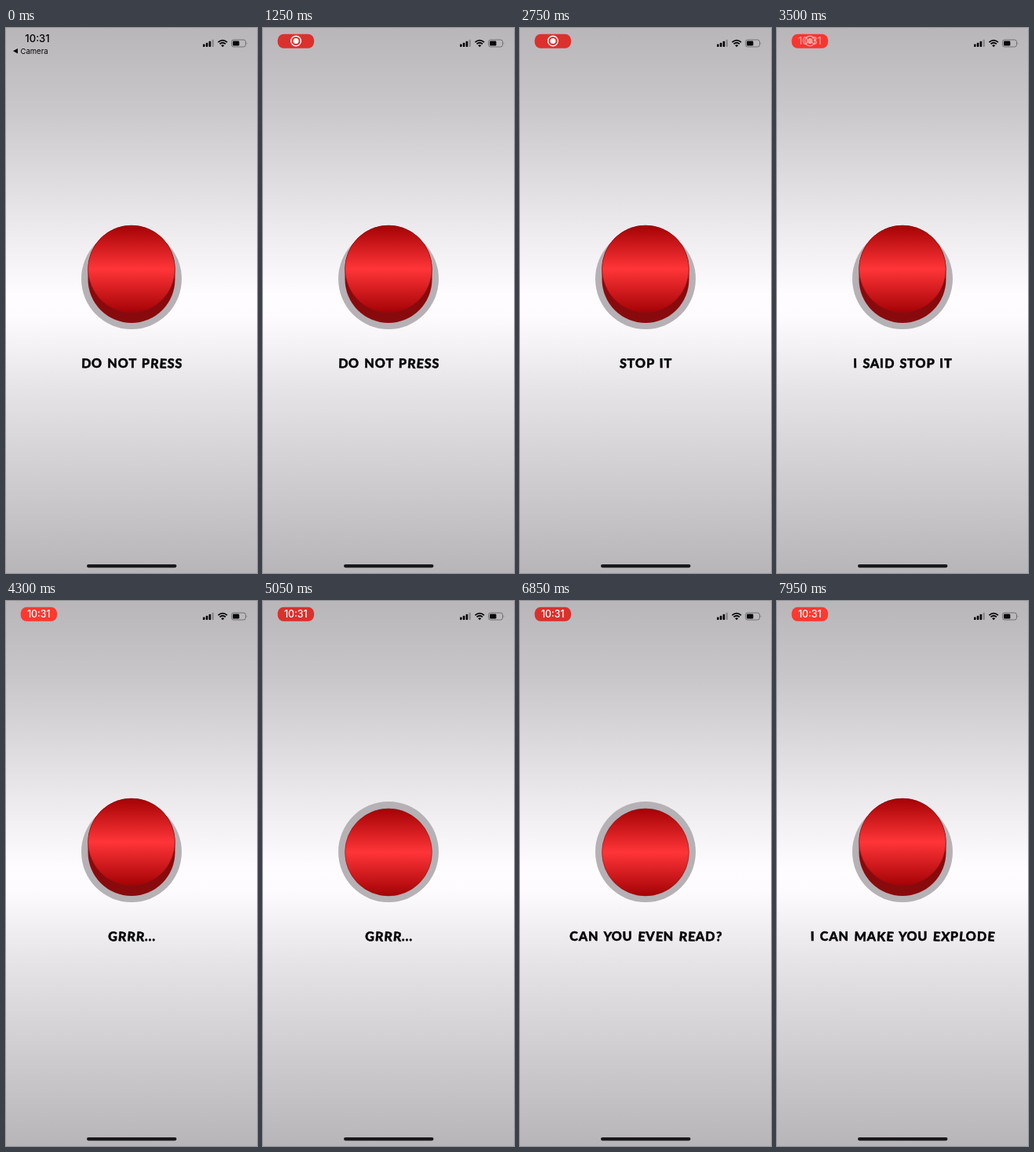
These frames come from a looping animation (320x693 px, 8 s). An HTML page:

```html
<!DOCTYPE html>
<html lang="en">
<head>
<meta charset="utf-8">
<title>Red button</title>
<style>
  html, body { margin: 0; width: 100%; height: 100%; overflow: hidden; background: #b8b5b9; }
  svg { display: block; width: 100%; height: 100%; }
  text { font-family: Inter, sans-serif; }
  .caption {
    font: 800 16.2px Lato, sans-serif;
    letter-spacing: .9px;
    word-spacing: 1.4px;
    text-anchor: middle;
    fill: #060507;
    stroke: #060507;
    stroke-width: .5px;
    stroke-linejoin: round;
  }
</style>
</head>
<body>
<svg viewBox="0 0 320 693" preserveAspectRatio="none">
  <defs>
    <linearGradient id="metal" x2="0" y2="1">
      <stop offset="0" stop-color="#b8b6b9"/>
      <stop offset=".14" stop-color="#c8c6c9"/>
      <stop offset=".36" stop-color="#ebe9ec"/>
      <stop offset=".49" stop-color="#fefcff"/>
      <stop offset=".53" stop-color="#fdfbfe"/>
      <stop offset=".66" stop-color="#e6e4e7"/>
      <stop offset="1" stop-color="#b8b5b9"/>
    </linearGradient>
    <linearGradient id="gloss" x2="0" y2="1">
      <stop offset="0" stop-color="#a40205"/>
      <stop offset=".5" stop-color="#ff3538"/>
      <stop offset="1" stop-color="#a40205"/>
    </linearGradient>
  </defs>

  <rect width="320" height="693" fill="url(#metal)"/>

  <g id="clock" fill="#050505">
    <text x="40" y="18" font-size="13" font-weight="500" text-anchor="middle">10:31</text>
    <path d="M9 29.2l6-3.2v6.4z"/>
    <text x="18.5" y="32.5" font-size="9.5" font-weight="400">Camera</text>
  </g>

  <g id="recording">
    <rect id="pill" x="18.7" y="7.7" width="46.4" height="18" rx="7.6" fill="#ff3830"/>
    <g id="icon" fill="#fff">
      <circle cx="42" cy="16.5" r="6.3" fill="none" stroke="#fff" stroke-width="1.4"/>
      <circle cx="42" cy="16.5" r="3.5"/>
    </g>
    <text id="pillTime" x="41.8" y="21" font-size="12.4" font-weight="500" text-anchor="middle" fill="#fff">10:31</text>
  </g>

  <g fill="#080808">
    <rect x="251" y="20.5" width="2.6" height="3.5" rx=".7"/>
    <rect x="254.8" y="18.8" width="2.6" height="5.2" rx=".7"/>
    <rect x="258.6" y="16.8" width="2.6" height="7.2" rx=".7"/>
    <rect x="262.4" y="14.8" width="2.6" height="9.2" rx=".7" opacity=".25"/>
    <path d="M276.2 24.2l-2.1-2.2q2.1-1.7 4.2 0z"/>
    <g fill="none" stroke="#080808" stroke-width="1.8">
      <path d="M272.5 20.3q3.7-3.1 7.4 0M270.4 18.1q5.8-5 11.6 0"/>
    </g>
    <rect x="287.5" y="15" width="18" height="9" rx="2.6" fill="none" stroke="#080808" stroke-opacity=".4"/>
    <rect x="289" y="16.5" width="8.4" height="6" rx="1.3"/>
    <path d="M306.7 18q1.5 1.5 0 3z" opacity=".45"/>
  </g>

  <circle cx="160" cy="319" r="64" fill="#b5b1b5"/>
  <rect id="side" x="104.5" y="251" width="111" height="124" rx="55.5" fill="#890a0d"/>
  <circle id="cap" cx="160" cy="306.5" r="55.4" fill="url(#gloss)" stroke="#8a1214" stroke-width=".6"/>

  <g id="captions"></g>
  <rect x="103" y="682" width="114.5" height="4.2" rx="2.1" fill="#19181a"/>
</svg>

<script>
  const LOOP = 8000, PERIOD = 900, FIRST_RELEASE = 600, HOLD = 200;
  const lines = [
    "DO NOT PRESS", "I'M SERIOUS", "STOP IT", "I SAID STOP IT", "GRRR...",
    "DO NOT PRESS THE RED BUTTON", "CAN YOU EVEN READ?",
    "YOU ARE MAKING ME ANGRY", "I CAN MAKE YOU EXPLODE"
  ];
  const $ = id => document.getElementById(id);

  // Plays [time, value] pairs; the last value holds until the loop restarts.
  function loop(el, prop, pairs, easing = "step-end") {
    const frames = pairs.map(([t, v]) => ({ offset: t / LOOP, [prop]: v, easing }));
    frames.push({ offset: 1, [prop]: pairs.at(-1)[1] });
    el.animate(frames, { duration: LOOP, iterations: Infinity }).startTime = 0;
  }

  const releases = lines.map((_, i) => FIRST_RELEASE + i * PERIOD);
  const presses = (up, down) => [[0, up], ...releases.flatMap(t => [[t - HOLD, down], [t, up]])];
  loop($("cap"), "transform", presses("translateY(0px)", "translateY(13px)"));
  loop($("side"), "opacity", presses(1, 0));

  lines.forEach((line, i) => {
    const text = document.createElementNS("http://www.w3.org/2000/svg", "text");
    text.setAttribute("class", "caption");
    text.setAttribute("x", 160.5);
    text.setAttribute("y", 432);
    // Small tilts give the lettering a hand-drawn bounce.
    const wobble = k => Math.sin(line.charCodeAt(k) * 7.3);
    text.setAttribute("rotate", [...line].map((_, k) => (2 + 3 * wobble(k)).toFixed(1)).join(" "));
    text.textContent = line;
    $("captions").append(text);
    const pairs = i ? [[0, 0], [releases[i], 1]] : [[0, 1]];
    if (i < lines.length - 1) pairs.push([releases[i + 1], 0]);
    loop(text, "opacity", pairs);
  });

  loop($("clock"), "opacity", [[0, 1], [450, 0]]);
  loop($("recording"), "opacity", [[0, 0], [450, 1]]);
  loop($("icon"), "opacity", [[0, 1], [3400, 1], [3600, 0]], "linear");
  loop($("pillTime"), "opacity", [[0, 0], [3400, 0], [3600, 1]], "linear");

  const bright = "#ff3830", dark = "#db302c";
  const pulse = [0, 2000, 4000, 6000].flatMap(t =>
    [[t, bright], [t + 350, bright], [t + 800, dark], [t + 1200, dark], [t + 1650, bright]]);
  loop($("pill"), "fill", pulse, "ease-in-out");
</script>
</body>
</html>
```
